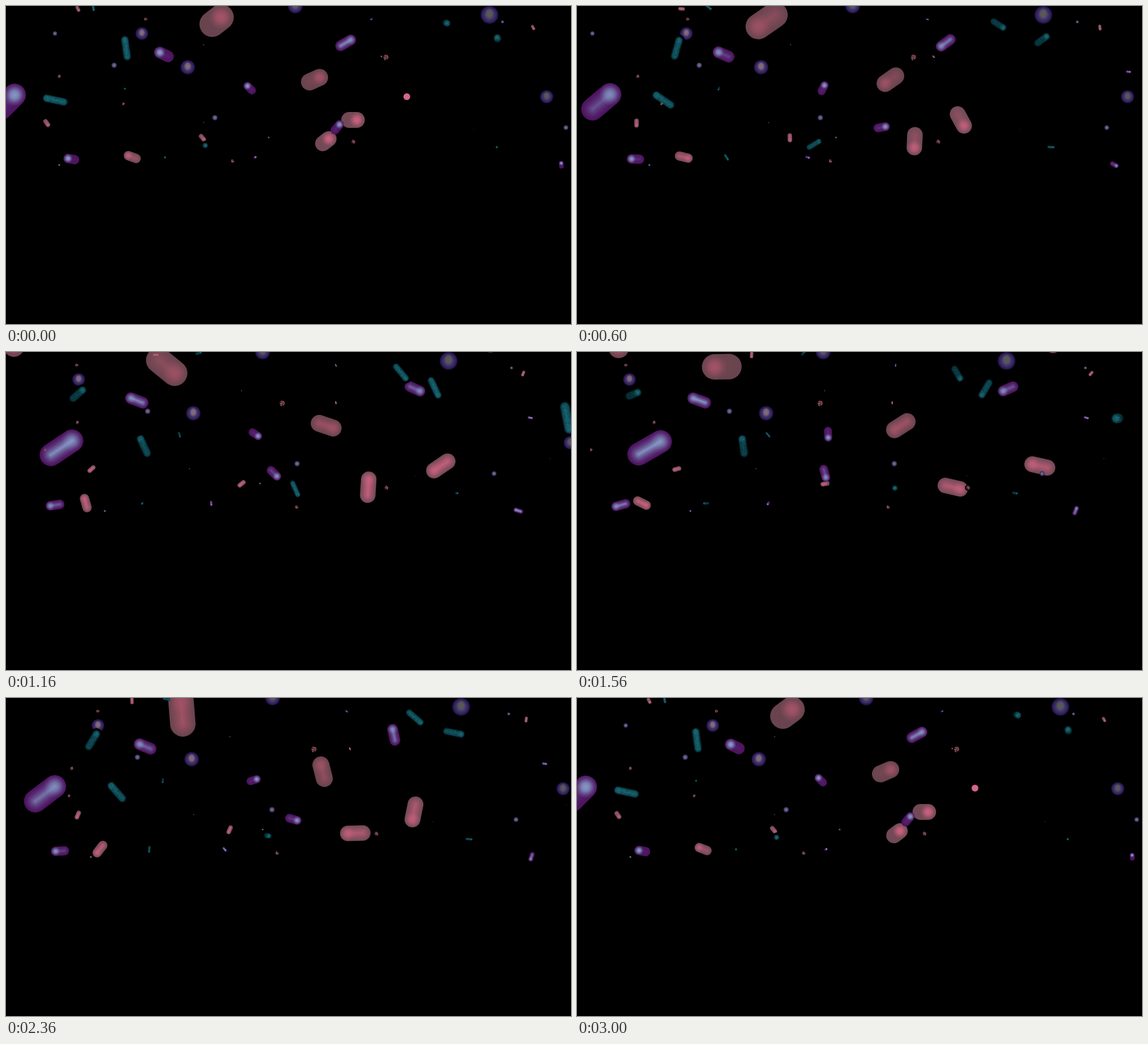
An HTML page with a canvas that plays this animation: 998x561 px, repeating every 3.04 s.

```html
<!DOCTYPE html>
<html lang="en">
<head>
<meta charset="utf-8">
<title>Floating capsules</title>
<style>
html, body { margin: 0; width: 100%; height: 100%; overflow: hidden; background: #000; }
canvas { display: block; }
</style>
</head>
<body>
<canvas id="c" width="998" height="561"></canvas>
<script>
const ctx = document.getElementById('c').getContext('2d');
const LOOP = 3040, STEP = 40, RAD = Math.PI / 180;

// aspect: half length of the axis relative to the radius
const SKINS = {
  rose:   { edge: [104, 68, 78], lit: [166, 84, 104],  aspect: .88, focus: 5, curve: 1 },
  pink:   { edge: [114, 74, 86], lit: [206, 98, 128],  aspect: 1.03, focus: 5, curve: 1 },
  purple: { edge: [78, 20, 96],  lit: [138, 166, 208], aspect: 1.12, focus: 7, curve: 1.5 },
  teal:   { edge: [6, 46, 53],   lit: [27, 110, 124],  aspect: 2.1, focus: 4, curve: .6 }
};

const rgb = (c, a = 1) => `rgba(${c.map(Math.round).join()},${a})`;
const mix = (a, b, k) => a.map((v, i) => v + (b[i] - v) * k);

function seeded(n) {
  let s = n * 7919 + 17;
  return () => (s = (s * 16807) % 2147483647) / 2147483647;
}

// The view swings out and back, a little late on the way out
function swing(t) {
  const a = 2 * Math.PI * t / LOOP;
  const late = 20 * Math.sin(a / 2) ** 2 - 2.4 * Math.sin(a) - 2.3 * Math.sin(2 * a);
  return .51 * (1 - Math.cos(a - late * RAD));
}

const pills = [], balls = [], grains = [];

// dx: travel over one swing; angle + spin: heading; tilt + roll: lean toward the viewer
function pill(skin, x, dx, y, r, angle, spin = 120, tilt = 30, roll = -40, dy = 0) {
  pills.push({ skin, x, dx, y, dy, r, angle, spin, tilt, roll, seed: pills.length + 1 });
}
const ball = (x, dx, y, r, core) => balls.push({ x, dx, y, r, core });
const grain = (x, dx, y, r) => grains.push({ x, dx, y, r, seed: grains.length + 90 });

pill('rose', -173, 246, -22, 18, 90, 0, 90, -70);
pill('rose', 903, -62, -12, 9, 0, 0, 80, 0, 5);
pill('rose', 372, -116, 26, 22.5, -38, 575, 60, -110);
pill('rose', 545, 27, 130, 15, -24, 530, 42, -40);
pill('pink', 613, 204, 201, 14, 0, 192, 62, -80);
pill('pink', 565, 98.5, 238.5, 13.7, -38, 410, 62, -80);
pill('pink', 223, -108, 266.5, 8.2, 200, 545, 30, -30);
pill('pink', 127, 181, 5, 3, 62, 390);
pill('pink', 72, 104, 206.5, 4, 55, 110);
pill('pink', 347, 91, 232.5, 4, 50);
pill('pink', 931, -23, 38, 2.6, 60, 70);
pill('pink', 664, -107, 89.5, 1.4, 30, 60);

pill('purple', 3, 125, 169, 20, -45, 15, 40, -45);
pill('purple', 279, -63, 85.5, 10.2, 205, -5, 45, -45);
pill('purple', 600, 161, 65, 9.4, -30, 545, 10, 15);
pill('purple', 430.5, 13, 145, 7, 225, 222, 45, -5);
pill('purple', 585, -147, 214, 7.6, -50, 125, 42, -15);
pill('purple', 115.5, -38, 270, 8.2, 190, -25, 50, -35);
pill('purple', 981, -100, 280, 4.1, -95, 385, 55, -70);
pill('purple', 440, -102, 267, 2.3, -30, 150, 70, -120);
pill('purple', 1009, -109, 116, 2.3, 0, 15);
pill('purple', 645, -82, 23.5, 1.3, -25);

const WARM = [134, 108, 124], OLIVE = [88, 90, 86];
ball(240, -147, 48.5, 11.2, WARM);
ball(321, 13, 108, 12.8, WARM);
ball(511, -76, 0, 13, OLIVE);
ball(854, -95, 15.7, 15.7, OLIVE);
ball(955, 55, 160, 11.6, OLIVE);
ball(86.5, -186, 48.5, 3.9);
ball(191, 78, 104.5, 4.8);
ball(369, 191, 197, 4.8);
ball(989, -167, 214.5, 4.3);
ball(877, 21, 28, 2.6);
ball(94, 106, 280.5, 2);
ball(464, -20, 232, 1.8);
ball(1056, -125, 188, .8);
ball(827, -138, 218, .7);

pill('teal', 212, -112, 74.5, 7.2, -98, 75, 0, 58);
pill('teal', 87, 206, 166, 7.4, 192, 70, 0, 35);
pill('teal', 778, -106, 30, 6.4, 20, 40, 85, -130, 8);
pill('teal', 868, -146, 57, 6.8, -110, 230, 85, -115, 8);
pill('teal', 1105, -150, 113, 9.4, 135, 400, -86, 350, 4);
pill('teal', 352, 209, 246, 5.2, -101, 220, 90, 360, -6);
pill('teal', 867, -93, 249, 2.2, 0, 10, 90, 220);
pill('teal', 281, -53, 267, 2.2, 0, 180, 90, 225);
pill('teal', 210, 127, 146, 1.9, 150, -100, 90, 75);
pill('teal', 154, 245, 2, 2.4, 80, -130, 0, 60);

grain(207.5, -182, 172.5, 2.8);
grain(93.5, 42, 124, 3);
grain(246.5, -160, 23, 2.6);
grain(671, -241, 90.5, 4.8);
grain(613.5, 77, 239.5, 3.4);
grain(400, 149, 273.5, 2.8);
grain(349, -33, 206, .8);
grain(349, 88, 68.5, .8);

function disc(x, y, r, fill) {
  ctx.fillStyle = fill;
  ctx.beginPath();
  ctx.arc(x, y, r, 0, 7);
  ctx.fill();
}

function radial(r, stops) {
  const g = ctx.createRadialGradient(0, 0, 0, 0, 0, r);
  stops.forEach(([at, color]) => g.addColorStop(at, color));
  return g;
}

function speckle(p, s) {
  const rand = seeded(p.seed), count = Math.round((s + p.r) * p.r * .8);
  for (let i = 0; i < count; i++) {
    const x = (rand() * 2 - 1) * (s + p.r * .6), y = (rand() * 2 - 1) * p.r * .8;
    ctx.fillStyle = rand() < .5 ? 'rgba(0,18,24,.35)' : `rgba(48,146,158,${x > s - p.r ? .35 : .15})`;
    ctx.fillRect(x, y, 1, 1);
  }
}

function drawPill(p, u) {
  const { edge, lit, aspect, focus, curve } = SKINS[p.skin];
  const flat = Math.abs(Math.cos((p.tilt + p.roll * u) * RAD));
  const r = p.r, s = flat * r * aspect;
  const fuzzy = p.skin === 'teal' && r > 4;
  const band = flat ** focus * .85, glow = 1 - .6 * flat ** focus;
  const rings = Math.max(3, Math.ceil(r));
  ctx.save();
  ctx.translate(p.x + p.dx * u, p.y + p.dy * u);
  ctx.rotate((p.angle + p.spin * u) * RAD);
  if (fuzzy) disc(s, 0, r + 3, '#000');
  ctx.lineCap = 'round';
  for (let i = 0; i < rings; i++) {
    const k = i / (rings - 1);
    ctx.strokeStyle = rgb(mix(edge, lit, band * k ** curve), fuzzy ? Math.min(1, .3 + k * 2) : 1);
    ctx.lineWidth = 2 * r * (1 - i / rings);
    ctx.beginPath();
    ctx.moveTo(-s, 0);
    ctx.lineTo(s + .01, 0);
    ctx.stroke();
  }
  // the end nearest the viewer catches the light
  ctx.translate(s, 0);
  disc(0, 0, r, radial(r, [
    [0, rgb(lit, glow)], [.35, rgb(lit, glow * .8)], [.75, rgb(lit, glow * .22)], [1, rgb(lit, 0)]
  ]));
  ctx.translate(-s, 0);
  if (fuzzy) speckle(p, s);
  ctx.restore();
}

function drawBall({ x, dx, y, r, core }, u) {
  ctx.save();
  ctx.translate(x + dx * u, y);
  if (core) {
    disc(0, 0, r, radial(r, [
      [0, '#5c5270'], [.5, '#43376a'], [.75, '#33245f'], [.92, '#27144c'], [1, '#180a34']
    ]));
    ctx.translate(0, -r * .15);
    ctx.scale(.82, 1);
    disc(0, 0, r * .62, radial(r * .62, [[0, rgb(core)], [.6, rgb(core, .8)], [1, rgb(core, 0)]]));
  } else {
    disc(0, 0, r, radial(r, [[0, '#8577a2'], [.5, '#62537f'], [1, '#2c2046']]));
  }
  ctx.restore();
}

function drawGrain(g, u) {
  const x = g.x + g.dx * u, r = g.r, rand = seeded(g.seed);
  if (r > 3) disc(x, g.y, r + 2, '#000');
  for (let i = 0; i < r * r * 3; i++) {
    const a = rand() * 2 * Math.PI, d = Math.sqrt(rand()) * r;
    ctx.fillStyle = rgb(mix([92, 52, 58], [190, 112, 122], rand()), .85);
    ctx.fillRect(x + Math.cos(a) * d * .85 - .5, g.y + Math.sin(a) * d - .5, 1.2, 1.2);
  }
}

function drawPointer(t) {
  const dt = t > LOOP / 2 ? t - LOOP : t;
  if (Math.abs(dt) <= 80) disc(708 + dt / 8, 160 + dt / 40, 6, '#d36787');
}

const solid = pills.filter(p => p.skin !== 'teal');
const rods = pills.filter(p => p.skin === 'teal');

function frame(now) {
  const t = Math.floor((now % LOOP) / STEP) * STEP, u = swing(t);
  ctx.fillStyle = '#000';
  ctx.fillRect(0, 0, 998, 561);
  solid.forEach(p => drawPill(p, u));
  balls.forEach(b => drawBall(b, u));
  rods.forEach(p => drawPill(p, u));
  grains.forEach(g => drawGrain(g, u));
  drawPointer(t);
}

const start = performance.now();
function tick() {
  frame(performance.now() - start);
  requestAnimationFrame(tick);
}
tick();
</script>
</body>
</html>
```
